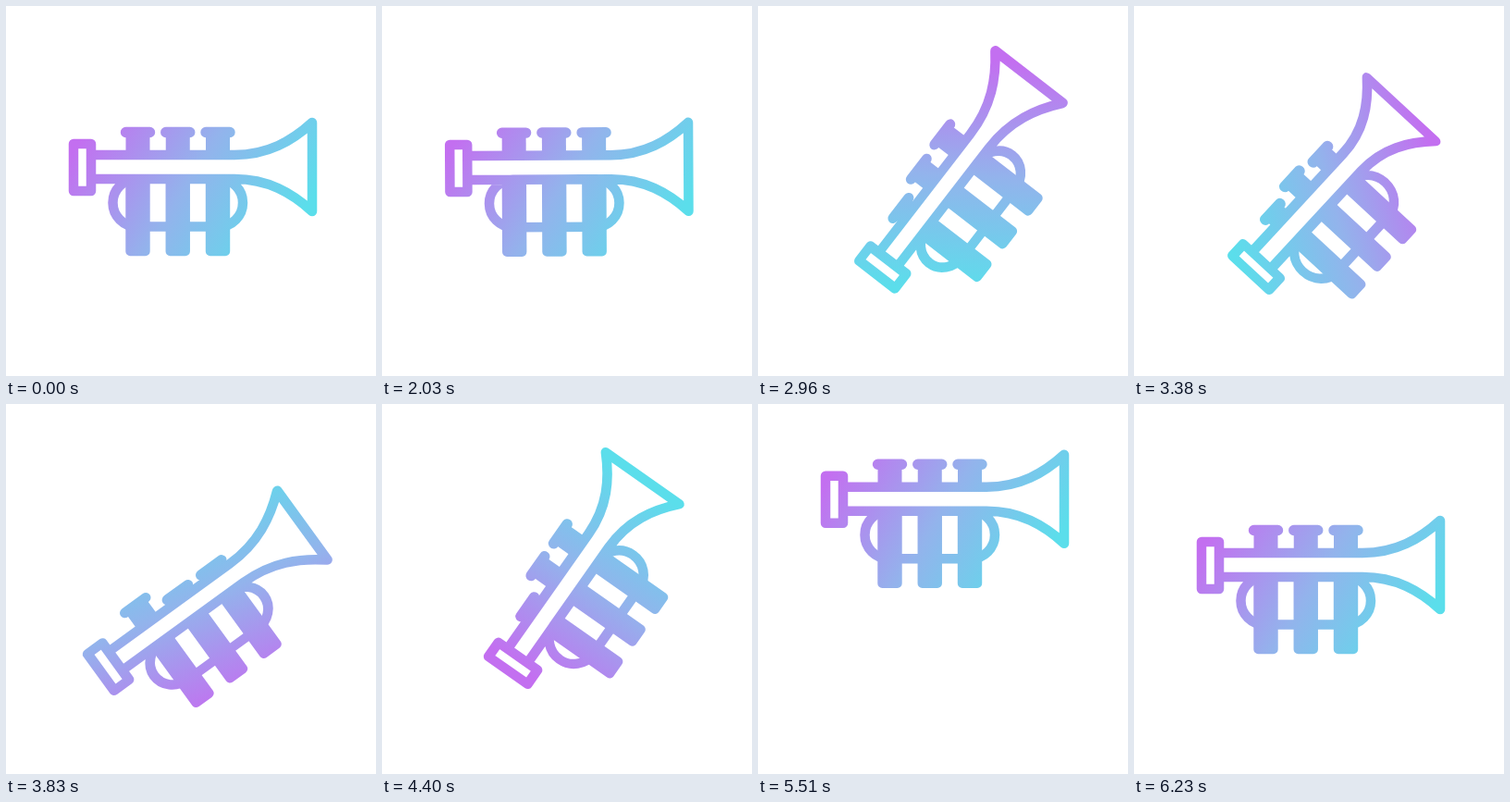
Write an HTML page with a canvas that moves like this. It is 400 px wide and 400 px high and loops after 6260 ms.

```html
<!DOCTYPE html>
<html lang="en">
<head>
<meta charset="utf-8">
<title>Trumpet</title>
<style>
html, body { margin: 0; height: 100%; overflow: hidden; background: #fff; }
canvas { display: block; }
</style>
</head>
<body>
<canvas id="stage" width="400" height="400"></canvas>
<script>
const ctx = document.getElementById('stage').getContext('2d');
const LOOP = 6260, START = 2030, STEP = 30, BEAT = 1260;
const RAD = Math.PI / 180;

// Poses: pivot x, pivot y, rotation in degrees, stretch along the horn
const REST = [200, 200, 0, 1];
const CROUCH = [187.5, 288, 16.5, 1.05];
const APEX = [200, 124, 0, 1];

const ramp = (t, from, to) => Math.min(1, Math.max(0, (t - from) / (to - from)));
const ease = (t, from, to) => {
  const u = ramp(t, from, to);
  return u * u * (3 - 2 * u);
};
const wave = (t, peak) => Math.cos(2 * Math.PI * (t - peak) / BEAT);

// Blend two poses; bend pushes the path of the pivot sideways
const mix = (a, b, w, bend = [0, 0]) =>
  a.map((v, i) => v + (b[i] - v) * w + 4 * w * (1 - w) * (bend[i] || 0));

const playing = t => [
  226.5 + 3 * wave(t, 3045),
  218 - 19.4 * wave(t, 3045),
  -45 - 10 * wave(t, 3110),
  1.004 + 0.072 * wave(t, 2765)
];

function poseAt(t) {
  if (t < 4900) {
    const raised = mix(REST, playing(t), ease(t, 2000, 2700), [12, 18]);
    return mix(raised, CROUCH, ease(t, 4500, 4900), [14, 0]);
  }
  const jump = mix(CROUCH, APEX, ease(t, 4900, 5420));
  const landed = mix(jump, REST, ramp(t, 5420, 5780) ** 2);
  const settle = Math.sin(Math.PI * ramp(t, 5780, 6200)) ** 2;
  return [landed[0], landed[1] + 8 * settle, landed[2], landed[3] + 0.018 * settle];
}

// How far a valve is pushed in, peaking once per beat
function press(t, peak) {
  const active = ease(t, 2150, 2450) - ease(t, 4560, 4740);
  return active * ramp(0.5 + 0.6 * wave(t, peak), 0, 1);
}

// Gradient direction relative to the horn: one full turn while playing
function tintAngle(t) {
  const tilt = 32 * (1 - ease(t, 2000, 2700) + ease(t, 5000, 5500));
  return (tilt + 360 * ramp(t, 2020, 4310)) * RAD;
}

const outline = new Path2D(
  'M73 149H92V200H73Z' +
  'M97 161H247C283 161 309 146 331 126V222C309 202 283 187 247 187H97');
outline.roundRect(115.5, 187, 140.5, 51.5, 25.7);

function valve(x, down) {
  const y = 136.5 + 16 * down;
  ctx.fillRect(x - 13, y, 26, 161 - y);
  ctx.beginPath();
  ctx.roundRect(x - 18.7, y - 5.7, 37.4, 11.4, 5.7);
  ctx.roundRect(x - 13.2, 187, 26.4, 83.2, [0, 0, 5, 5]);
  ctx.fill();
}

function gradient(angle) {
  const dx = 123 * Math.cos(angle), dy = 123 * Math.sin(angle);
  const g = ctx.createLinearGradient(205 - dx, 177 - dy, 205 + dx, 177 + dy);
  ['#c36ff0', '#93b3ec', '#5bdeeb'].forEach((c, i) => g.addColorStop(i / 2, c));
  return g;
}

function draw(t) {
  const [x, y, turn, stretch] = poseAt(t);
  ctx.setTransform(1, 0, 0, 1, 0, 0);
  ctx.fillStyle = '#fff';
  ctx.fillRect(0, 0, 400, 400);

  ctx.translate(x, y);
  ctx.rotate(turn * RAD);
  ctx.scale(stretch, 1 - 0.8 * (stretch - 1));
  ctx.translate(-200, -200);

  ctx.fillStyle = ctx.strokeStyle = gradient(tintAngle(t));
  ctx.lineWidth = 10.5;
  ctx.lineJoin = 'round';
  ctx.stroke(outline);
  [3150, 3790, 3700].forEach((peak, i) => valve(142.5 + 43.25 * i, press(t, peak)));
}

function frame(now) {
  const t = now % LOOP;
  draw(t < START ? 0 : START + STEP * Math.floor((t - START) / STEP));
  requestAnimationFrame(frame);
}
frame(performance.now());
</script>
</body>
</html>
```
